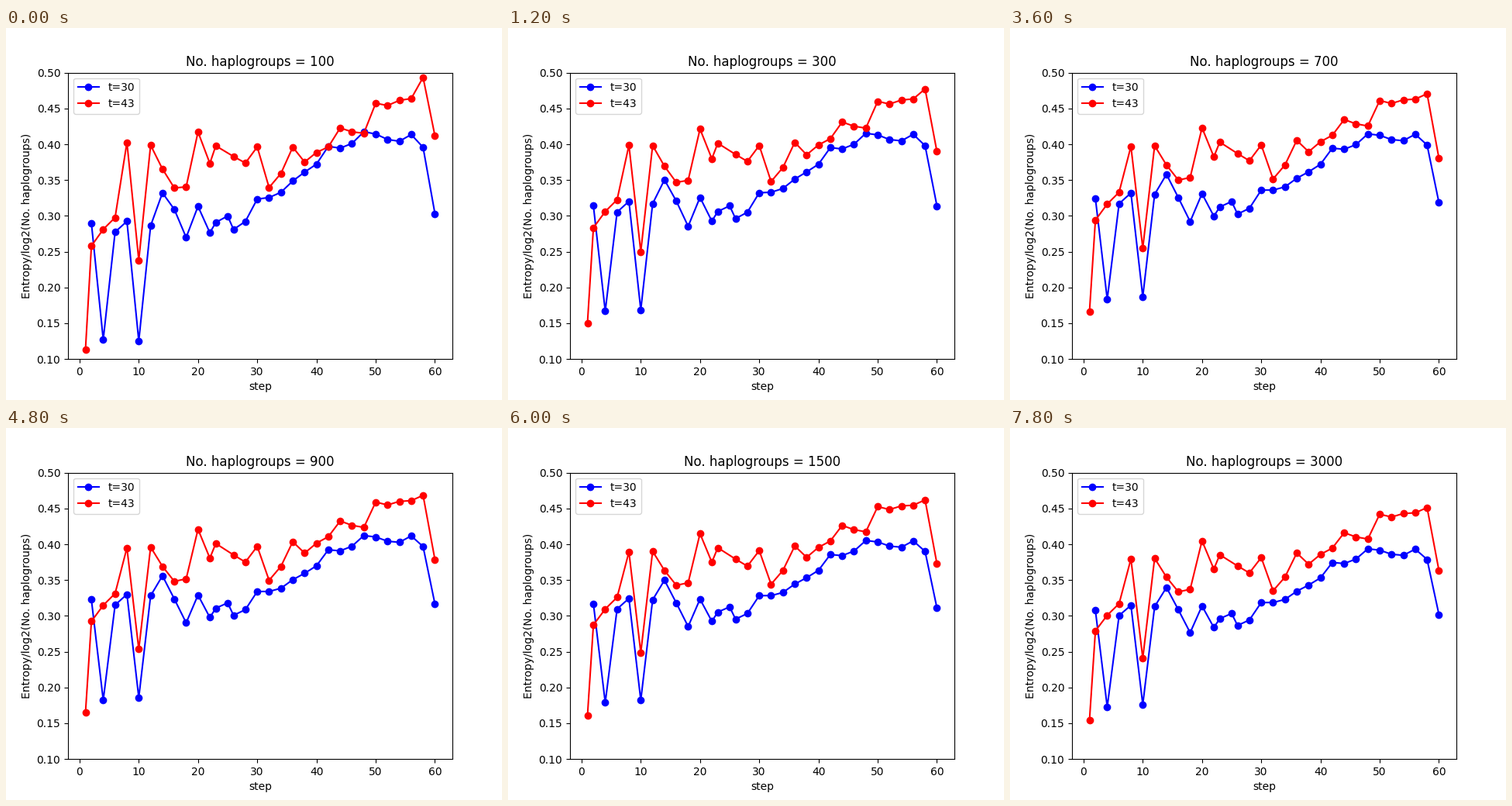
Animation, 640 px wide and 480 px high, one loop 8 s. Source, as a matplotlib script:

```python
from math import log

import numpy as np
import matplotlib.pyplot as plt
from matplotlib.animation import FuncAnimation

TICK = 200   # ms per drawn frame
HOLD = 3     # drawn frames per chart
FRAMES = 40
FIRST, PEAK, LAST = 100, 700, 3000   # haplogroup counts

COUNTS = [*range(100, 1001, 100), *range(1500, 3001, 500)]
EVENS = list(range(2, 23, 2))
TAIL = list(range(26, 61, 2))


class Series:
    """Entropy curve in thousandths, known at PEAK and bent for other counts."""

    def __init__(self, steps, values, early_bend, late_drop):
        self.steps = np.array(steps)
        self.values = np.array(values)
        # Few groups: low entropies sink further, plus a bend along the steps
        bend = np.interp(self.steps, *zip(*early_bend))
        self.early = 0.14 * (self.values - 400) + bend
        # Many groups: a drop that grows with the entropy
        base, slope = late_drop
        self.late = -(base + slope * self.values)

    def at(self, count):
        early = max(0, (PEAK - count) / (PEAK - FIRST)) ** 3
        late = max(0, log(count / PEAK) / log(LAST / PEAK)) ** 1.25
        return (self.values + early * self.early + late * self.late) / 1000


blue = Series(
    EVENS + [23, 25] + TAIL,
    [324.5, 183.5, 317, 332, 187, 330, 358, 325.5, 292, 331, 299.5,
     312.5, 320, 302.5, 310.5, 336, 336, 340.5, 352.5, 361.5, 372,
     394.5, 393, 399.5, 414.5, 412.5, 406.5, 405, 414, 399, 318.5],
    [(2, -24), (12, -34), (16, -6), (24, -10), (38, 5), (60, -4)],
    (2.6, 0.044))
red = Series(
    [1] + EVENS + [23] + TAIL,
    [166, 294, 316.5, 333, 397, 255, 398, 371, 350, 353.5, 423,
     382.5, 403, 387, 377, 399, 351.5, 371, 405.5, 389.5, 403.5,
     412.5, 434.5, 428.5, 425.5, 461, 457, 462, 463, 470.5, 380.5],
    [(1, -20), (6, -26), (8, 6), (20, -9), (28, 0), (42, -18), (56, -8),
     (60, 34)],
    (8, 0.024))

fig, ax = plt.subplots(figsize=(6.4, 4.8), dpi=100)
curves = []
for series, style, label in [(blue, "b-o", "t=30"), (red, "r-o", "t=43")]:
    line, = ax.plot(series.steps, series.at(FIRST), style, label=label)
    curves.append((series, line))
ax.set_xlim(-1.95, 62.95)
ax.set_ylim(0.1, 0.5)
ax.set_xlabel("step")
ax.set_ylabel("Entropy/log2(No. haplogroups)")
ax.legend(loc="upper left")
title = ax.set_title("")


def draw(i):
    count = COUNTS[i // HOLD]
    for series, line in curves:
        line.set_ydata(series.at(count))
    title.set_text(f"No. haplogroups = {count}")
    return [line for _, line in curves] + [title]


anim = FuncAnimation(fig, draw, frames=FRAMES, interval=TICK,
                     repeat=True, repeat_delay=0, blit=False)
plt.show()
```
